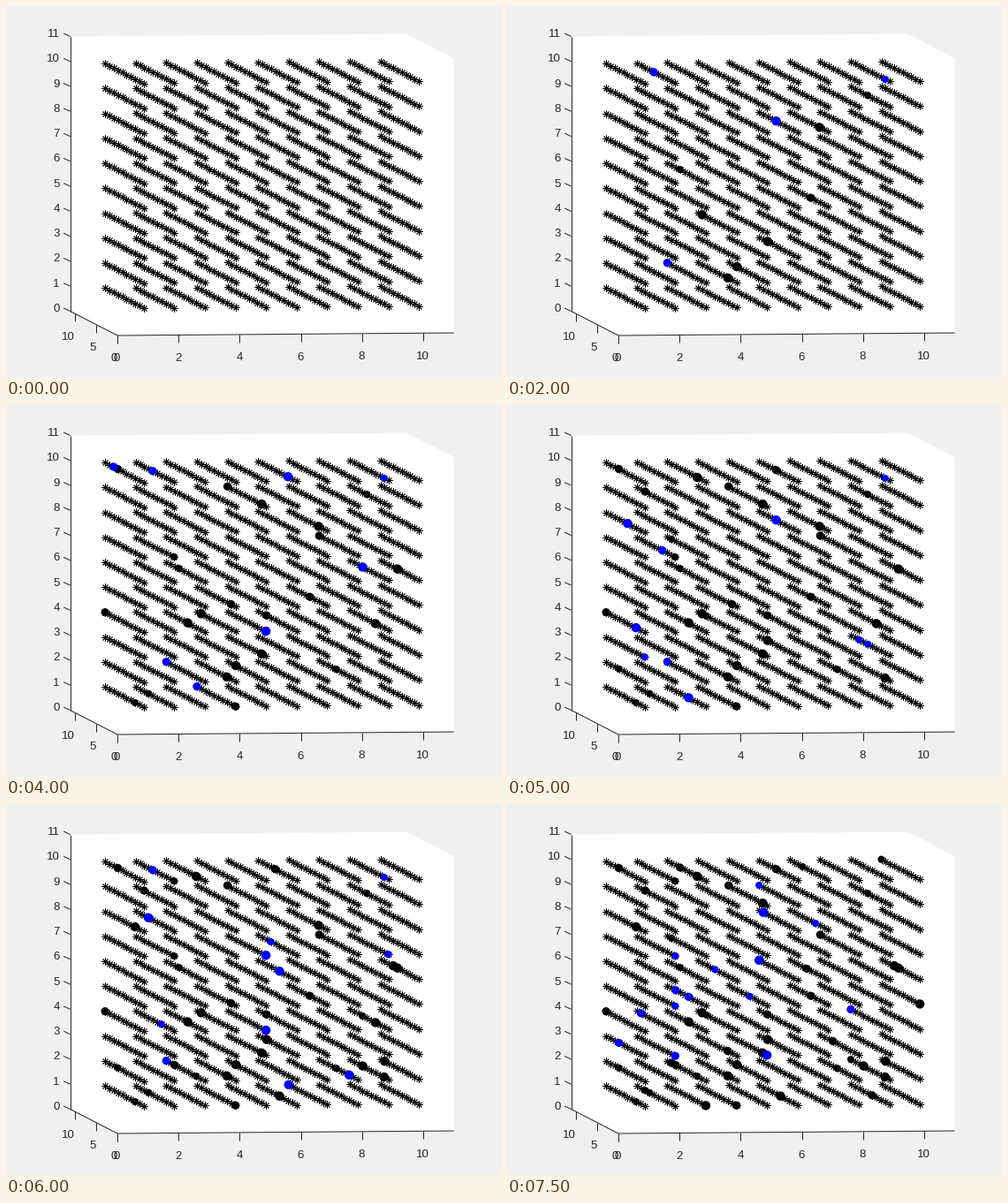
A matplotlib script that plays this animation: 560x420 px, repeating every 8 s.

```python
import random
from itertools import product

import matplotlib.pyplot as plt
import numpy as np
from matplotlib.animation import FuncAnimation

W, H, DPI = 560, 420, 100
PX = 72 / DPI
INK = "#262626"
STEPS, STEP_MS = 16, 500
CELLS = list(product(range(1, 11), repeat=3))

# cells that pulse regularly: (first step, period)
PULSES = {
    (9, 2, 10): (2, 2), (3, 10, 2): (2, 2),
    (2, 6, 10): (4, 4), (6, 6, 8): (4, 6),
    (1, 3, 4): (6, 4), (9, 8, 3): (6, 4),
    (6, 5, 6): (6, 6), (5, 1, 4): (8, 4),
}
# the first cells to turn black
EARLY = [(4, 9, 4), (9, 6, 9), (7, 5, 5), (4, 3, 2),
         (7, 3, 8), (5, 8, 2), (6, 8, 3), (3, 7, 6)]

plt.rcParams["font.family"] = "Liberation Sans"
fig = plt.figure(figsize=(W / DPI, H / DPI), dpi=DPI, facecolor="#f0f0f0")
ax = fig.add_axes([0, 0, 1, 1])
ax.set(xlim=(0, W), ylim=(H, 0))
ax.axis("off")


def project(x, y, z):
    """Orthographic view: lattice coordinates to stage pixels."""
    return 126 + 34.6 * x - 4.85 * y, 373 - 0.27 * x - 2.5 * y - 28.27 * z


def line(a, b):
    ax.plot([a[0], b[0]], [a[1], b[1]], color=INK, lw=PX, solid_capstyle="butt")


def label(x, y, value, ha):
    ax.text(x, y, str(value), color=INK, size=13.3 * PX, ha=ha, va="center_baseline")


def draw_axes():
    outline = [(0, 11, 11), (11, 11, 11), (11, 0, 11), (11, 0, 0), (0, 0, 0), (0, 11, 0)]
    ax.add_patch(plt.Polygon([project(*p) for p in outline], fc="white", ec="none"))
    origin, back = project(0, 0, 0), project(0, 11, 0)
    line(origin, project(11, 0, 0))
    line(origin, back)
    line(back, project(0, 11, 11))
    for v in range(0, 11, 2):
        x, y = project(v, 0, 0)
        line((x, y), (x, y + 9))
        label(x - 0.5, y + 25, v, "center")
    for v in (0, 5, 10):
        x, y = project(0, v, 0)
        line((x, y), (x, y + 9))
        label(x, y + 25, v, "right")
    for v in range(12):
        x, y = project(0, 11, v)
        line((x, y), (x - 7.5, y - 3.5))
        label(x - 12, y - 4, v, "right")


def draw_lattice():
    ax.plot(*zip(*(project(*c) for c in CELLS)), ls="none", marker=(8, 2, 0),
            ms=8 * PX, mec="black", mew=0.9 * PX, antialiased=False)


def simulate():
    """Blue and black cells for every step; activity grows with time."""
    rng = random.Random(4)
    rest = [c for c in CELLS if c not in PULSES and c not in EARLY]
    spots = EARLY + rng.sample(rest, 60)
    radius = {c: rng.choice((4, 4.6, 5.2)) for c in CELLS}
    history = []
    for step in range(STEPS):
        blue = [c for c, (first, period) in PULSES.items()
                if step >= first and (step - first) % period == 0]
        blue += rng.sample(rest, max(0, step - len(blue)))
        black = [c for c in spots[:4 * max(0, step - 2)] if rng.random() < 0.9]
        history.append([{c: radius[c] for c in group} for group in (black, blue)])
    return history


draw_axes()
draw_lattice()
history = simulate()
dots = [ax.scatter([], [], color=c, linewidths=0, zorder=z)
        for c, z in (("black", 3), ("blue", 4))]


def update(step):
    for dot, cells in zip(dots, history[step]):
        dot.set_offsets([project(*c) for c in cells] or np.empty((0, 2)))
        dot.set_sizes([(2 * r * PX) ** 2 for r in cells.values()])
    return dots


anim = FuncAnimation(fig, update, frames=STEPS, interval=STEP_MS,
                     repeat=True, repeat_delay=0)
plt.show()
```
